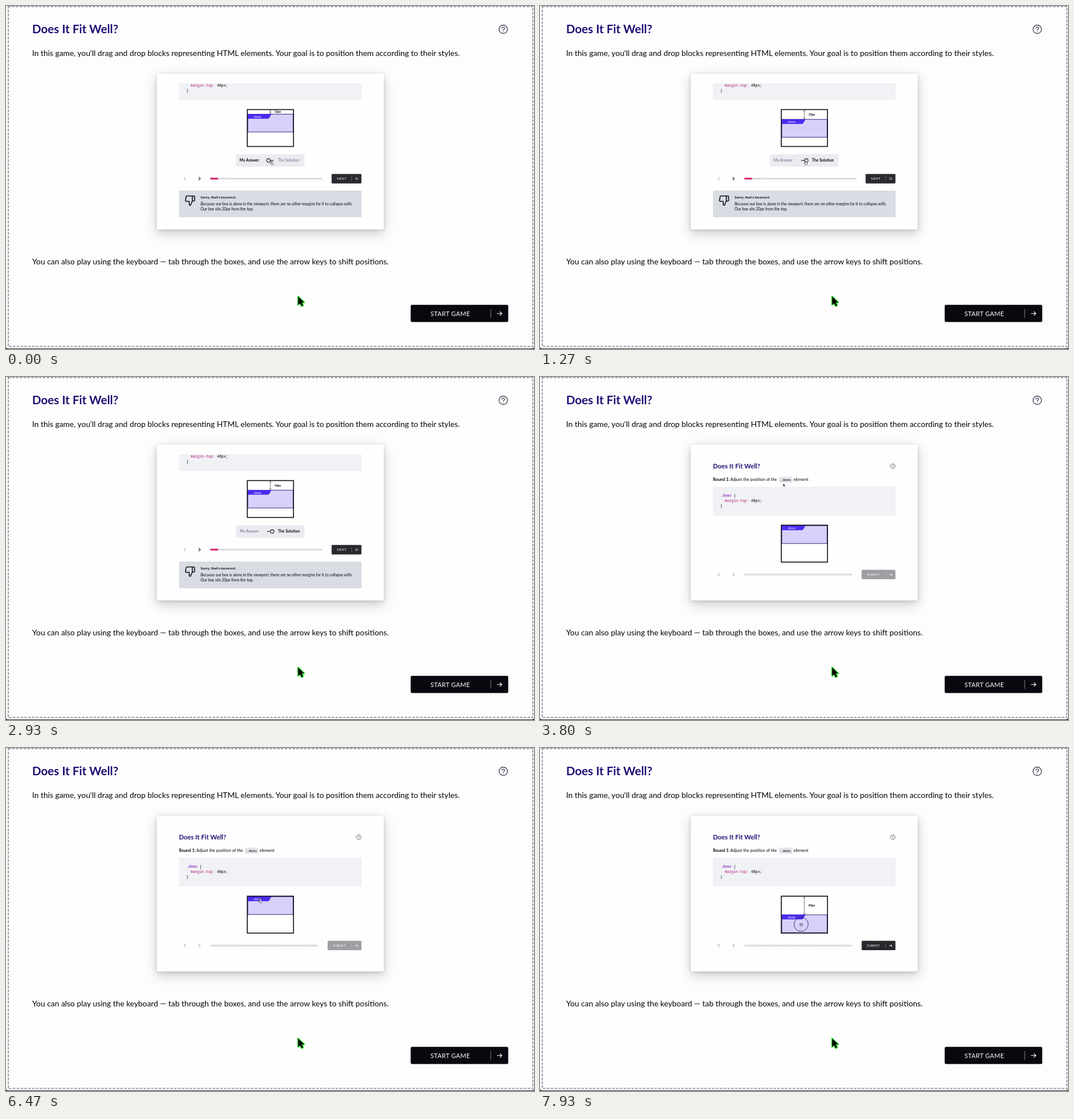
Recreate the animation shown at these times as an HTML page. Size 928 by 604 pixels, loop 8000 ms.

```html
<!DOCTYPE html>
<html lang="en">
<head>
<meta charset="utf-8">
<title>Does It Fit Well?</title>
<style>
  html, body { margin: 0; width: 100%; height: 100%; overflow: hidden; background: #fdfdfd; }
  svg { display: block; width: 928px; height: 604px; font-family: Lato, sans-serif; fill: #050508; }
  text { white-space: pre; }
  .title { font-weight: 700; fill: #200f75; }
  .body { font-size: 13.83px; }
  .mono { font: 6.45px "Noto Sans Mono", monospace; }
  .small { font-size: 7.35px; }
  .note { font-size: 6.75px; }
  .opt { font-size: 6.8px; fill: #6a6a7c; }
  .opt.on { font-weight: 700; fill: #0b0b12; }
  .bold { font-weight: 700; }
  .line { fill: none; stroke-linecap: round; stroke-linejoin: round; }
  .card { filter: drop-shadow(0 1px 3px rgba(0, 0, 0, .15)) drop-shadow(0 7px 10px rgba(0, 0, 0, .19)); }
  .btn { fill: #fff; font-size: 5.6px; letter-spacing: .35px; }
</style>
</head>
<body>
<svg viewBox="0 0 928 604">
  <defs>
    <clipPath id="pane"><rect x="265" y="136" width="399" height="257"/></clipPath>
    <g id="help">
      <circle r="7.4" fill="none" stroke="#5b5b6e" stroke-width="1.6"/>
      <path class="line" d="M-2.2-1.6C-2-4.6 2.5-4.4 2.4-1.6 2.4 0 0 .1 0 1.6M0 3.9V4" stroke="#5b5b6e" stroke-width="1.5"/>
    </g>
    <path id="arrow" class="line" d="M-4 0H4M.8-3.2 4 0 .8 3.2"/>
  </defs>

  <rect width="928" height="604" fill="#fdfdfd"/>
  <rect x="4" y="1" width="922" height="598.5" fill="none" stroke="#9a9aa8" stroke-width="2" stroke-dasharray="4.5 2.25"/>
  <path d="M0 600Q0 603 4 603H924Q928 603 928 600V604H0Z" fill="#25252b"/>

  <text class="title" x="46" y="48" font-size="20.6">Does It Fit Well?</text>
  <use href="#help" x="874" y="41"/>
  <text class="body" x="46" y="88">In this game, you'll drag and drop blocks representing HTML elements. Your goal is to position them according to their styles.</text>
  <text class="body" x="46" y="455">You can also play using the keyboard — tab through the boxes, and use the arrow keys to shift positions.</text>

  <rect x="711.3" y="526.2" width="171.4" height="30.3" rx="2.5" fill="#08080f"/>
  <text x="746" y="545.5" font-size="11" letter-spacing=".3" fill="#fff">START GAME</text>
  <path d="M852 533.5V549" stroke="#85858f"/>
  <use href="#arrow" x="867.5" y="541.5" stroke="#fff" stroke-width="1.2"/>

  <rect class="card" x="265" y="119" width="399" height="274.5" rx="3" fill="#fefefe"/>

  <g clip-path="url(#pane)">
    <g id="page">
      <text class="title" x="304" y="161" font-size="11.3">Does It Fit Well?</text>
      <use href="#help" transform="translate(620 157) scale(.56)"/>
      <text class="small bold" x="304" y="183">Round 1:</text>
      <text class="small" x="334.5" y="183">Adjust the position of the</text>
      <rect x="420" y="175.5" width="23.5" height="10.5" rx="1" fill="#e3e3ea"/>
      <text class="mono" x="422.5" y="183" style="font-size:6.1px">.demo</text>
      <text class="small" x="445.5" y="183">element</text>

      <rect x="304" y="193" width="321" height="51" rx="2" fill="#f1f2f6"/>
      <text class="mono" x="317" y="211"><tspan fill="#7a10b8">.demo</tspan> {</text>
      <text class="mono" x="324.5" y="220"><tspan fill="#b01a78">margin-top:</tspan> 40px;</text>
      <text class="mono" x="317" y="229">}</text>

      <rect x="424.1" y="260.9" width="81.2" height="65" fill="#fff"/>
      <g id="gap">
        <path id="ruler" class="line" stroke="#555560" stroke-width=".8"/>
        <text id="size" class="bold" x="472" font-size="5"></text>
      </g>
      <g id="demo">
        <rect x="425" y=".2" width="79.8" height="31.4" fill="#d8d0fa" stroke="#24156f" stroke-width=".9"/>
        <path d="M425 0H468C464 .8 464.8 8.2 459.5 8.2H425Z" fill="#4a2cf0"/>
        <text class="mono" x="432.5" y="6.5" style="font-size:5.5px;fill:#f2efff">.demo</text>
      </g>
      <rect x="424.1" y="260.9" width="81.2" height="65" fill="none" stroke="#0d0d18" stroke-width="1.6"/>
    </g>
  </g>

  <g id="play">
    <path class="line" d="M315.2 345.6 312.8 348 315.2 350.4M339 345.6 341.4 348 339 350.4" stroke="#777783" stroke-width=".9"/>
    <rect x="359" y="346.5" width="189.5" height="3" rx="1" fill="#dadae3"/>
    <path d="M372 352.3H549" stroke="#d3d3dc" stroke-width="1.4" stroke-dasharray="1 12.6"/>
    <rect id="submit" x="565.3" y="339.5" width="59.4" height="16.6" rx="1.5"/>
    <text class="btn" x="574.5" y="350">SUBMIT</text>
    <path d="M607.5 344V352" stroke="#fff" stroke-opacity=".35" stroke-width=".7"/>
    <use href="#arrow" transform="translate(616.3 348) scale(.55)" stroke="#fff" stroke-width="1.5"/>
  </g>

  <g id="review">
    <rect x="404" y="261" width="120.5" height="22" rx="2.5" fill="#ebecf2"/>
    <text id="mine" class="opt" x="410.5" y="274.4">My Answer</text>
    <text id="right" class="opt" x="478" y="274.4">The Solution</text>
    <path id="bar" class="line" stroke="#111118" stroke-width="1.2"/>
    <circle id="knob" cy="272" r="3.1" fill="#fff" stroke="#111118" stroke-width="1.1"/>

    <path class="line" d="M315.2 301.6 312.8 304 315.2 306.4" stroke="#8a8a96" stroke-width=".9"/>
    <path class="line" d="M339 301.6 341.4 304 339 306.4" stroke="#111118" stroke-width="1.1"/>
    <rect x="359" y="302.5" width="197" height="3" rx="1" fill="#dadae3"/>
    <rect x="359" y="302.5" width="14" height="3" rx="1" fill="#d6246f"/>
    <path d="M401 308.3H549" stroke="#d3d3dc" stroke-width="1.4" stroke-dasharray="1 13.1"/>
    <rect x="572.3" y="295.8" width="52.4" height="16.6" rx="1.5" fill="#292930"/>
    <text class="btn" x="581.5" y="306" style="font-size:6px">NEXT</text>
    <path d="M607.5 300V308" stroke="#fff" stroke-opacity=".35" stroke-width=".7"/>
    <path class="line" d="M614.4 302.2 616 304 614.4 305.8M616.8 302.2 618.4 304 616.8 305.8" stroke="#fff" stroke-width=".8"/>

    <rect x="304" y="325" width="321" height="47" rx="2" fill="#dadce4"/>
    <path class="line" d="M327.5 334.5H318.3Q316.8 334.5 316.6 336L315.5 342Q315.3 344 317 344H322V348.5Q322 351 324.2 351L327.5 343.5V334.5H330Q331.5 334.5 331.5 336V342Q331.5 343.5 330 343.5H327.5" stroke="#0b0b12" stroke-width="1.6"/>
    <text class="bold" x="342" y="339" font-size="6.45">Sorry, that's incorrect.</text>
    <text class="note" x="342" y="351.2">Because our box is alone in the viewport, there are no other margins for it to collapse with.</text>
    <text class="note" x="342" y="360.2">Our box sits 20px from the top.</text>
  </g>

  <circle id="ring" fill="none" stroke="#2c2360" stroke-width=".9"/>
  <g id="pointer">
    <path id="tip" d="M-.6-2.8V3L.7 1.9 1.7 4 2.6 3.5 1.7 1.5H3.3Z" stroke="#fff" stroke-width=".5"/>
    <path id="beam" class="line" d="M-1.3-3Q0-3 0-2V2Q0 3-1.3 3M1.3-3Q0-3 0-2M0 2Q0 3 1.3 3" stroke="#111118" stroke-width=".8"/>
    <path id="hand" class="line" d="M-1-3Q-.1-3.6.2-2.6V-.5L2.2.1Q2.9.4 2.7 1.4L2.1 4H-.8L-2.6 1.2Q-2.4.2-1 1.2Z" style="fill:#fff" stroke="#333340" stroke-width=".8"/>
    <path id="fist" class="line" d="M-2-1.4Q0-2.7 2-1.3 2.8-.5 2.4 1L1.8 2.6H-1.3L-2.5.8Q-2.6-.8-2-1.4ZM-.6-.8V.5M.8-.8V.5" style="fill:#fff" stroke="#333340" stroke-width=".8"/>
  </g>

  <path d="M513.4 511.5V526.2L516.8 523.4 519.6 528.6 522.2 527.2 519.6 522H524.2Z" fill="#050505" stroke="#3fe63f" stroke-width="2.8" stroke-linejoin="round" paint-order="stroke"/>
</svg>

<script>
  const LOOP = 8000, RESTART = 3400, TOGGLED_BACK = -220, TOGGLED = 917, GRAB = 6700;
  const SCROLL = -78.5, UNIT = 0.4, TOP = 261.6;

  const $ = id => document.getElementById(id);
  const clamp = (v, lo, hi) => Math.min(hi, Math.max(lo, v));
  const ease = p => p * p * (3 - 2 * p);
  const set = (id, attrs) => { for (const k in attrs) $(id).setAttribute(k, attrs[k]); };
  const show = (id, on) => { $(id).style.display = on ? '' : 'none'; };

  // time, x, y
  const path = [
    [0, 467, 275.5], [3399, 467, 275.5],
    [3400, 428, 190], [4300, 428, 190], [5000, 322, 215], [5350, 322, 215],
    [6130, 437, 267], [6200, 437, 267], [6400, 447, 268.5], [GRAB, 447, 268.5],
    [7500, 459, 311], [8000, 459, 311]
  ];

  function cursorAt(t) {
    const i = Math.max(1, path.findIndex(p => p[0] > t));
    const [a, b] = [path[i - 1], path[i]];
    const p = ease(clamp((t - a[0]) / (b[0] - a[0]), 0, 1));
    return [a[1] + (b[1] - a[1]) * p, a[2] + (b[2] - a[2]) * p];
  }

  const spring = ms => Math.exp(-ms / 125) * Math.cos(ms / 100);
  const settle = ms => Math.exp(-((ms / 300) ** 2));
  const answer = (t, curve) => t < TOGGLED
    ? 20 + 20 * curve(t - TOGGLED_BACK)
    : 40 - 20 * curve(t - TOGGLED);
  const dragged = t => t < GRAB ? 0 : clamp((cursorAt(t)[1] - 268.5) / UNIT, 0, 80);

  function drawBox(margin, label) {
    const h = margin * UNIT, end = TOP + h - .8;
    set('demo', { transform: `translate(0 ${TOP + h})` });
    show('gap', h > 2.5);
    set('ruler', { d: `M464.5 ${TOP + .6}V${end}M462.8 ${TOP + 2.4}L464.5 ${TOP + .6} 466.2 ${TOP + 2.4}M462.8 ${end - 1.8}L464.5 ${end} 466.2 ${end - 1.8}` });
    set('size', { y: TOP + h / 2 + 1.6 });
    $('size').textContent = Math.round(label) + 'px';
  }

  function drawSwitch(t) {
    const solved = t >= TOGGLED;
    const p = ease(clamp((t - TOGGLED) / 150, 0, 1));
    set('knob', { cx: 461.3 + 6.7 * p });
    set('bar', { d: `M${465 - 5.8 * p} 272H${470 - 5.4 * p}` });
    $('mine').classList.toggle('on', !solved);
    $('right').classList.toggle('on', solved);
  }

  function drawPointer(t, reviewing) {
    const [x, y] = cursorAt(t);
    const held = t >= GRAB;
    const overText = !reviewing && x < 392 && y > 203 && y < 233;
    const overBox = reviewing || (x > 425 && x < 505 && y > TOP);
    set('pointer', {
      transform: `translate(${x} ${y})`,
      opacity: reviewing ? 1 - clamp((t - 1800) / 200, 0, 1) : 1
    });
    show('fist', held);
    show('hand', overBox && !held);
    show('beam', overText);
    show('tip', !overBox && !overText);
    show('ring', held);
    set('ring', { cx: x, cy: y - .5, r: 12.4 * ease(clamp((t - GRAB) / 200, 0, 1)) });
  }

  function draw(t) {
    const reviewing = t < RESTART;
    show('review', reviewing);
    show('play', !reviewing);
    set('page', { transform: `translate(0 ${reviewing ? SCROLL : 0})` });
    if (reviewing) {
      drawSwitch(t);
      drawBox(answer(t, spring), answer(t, settle));
    } else {
      drawBox(dragged(t), dragged(t - 120));
      set('submit', { fill: dragged(t) > 0 ? '#28282e' : '#9d9da2' });
    }
    drawPointer(t, reviewing);
  }

  function tick() {
    draw(performance.now() % LOOP);
    requestAnimationFrame(tick);
  }
  tick();
</script>
</body>
</html>
```
